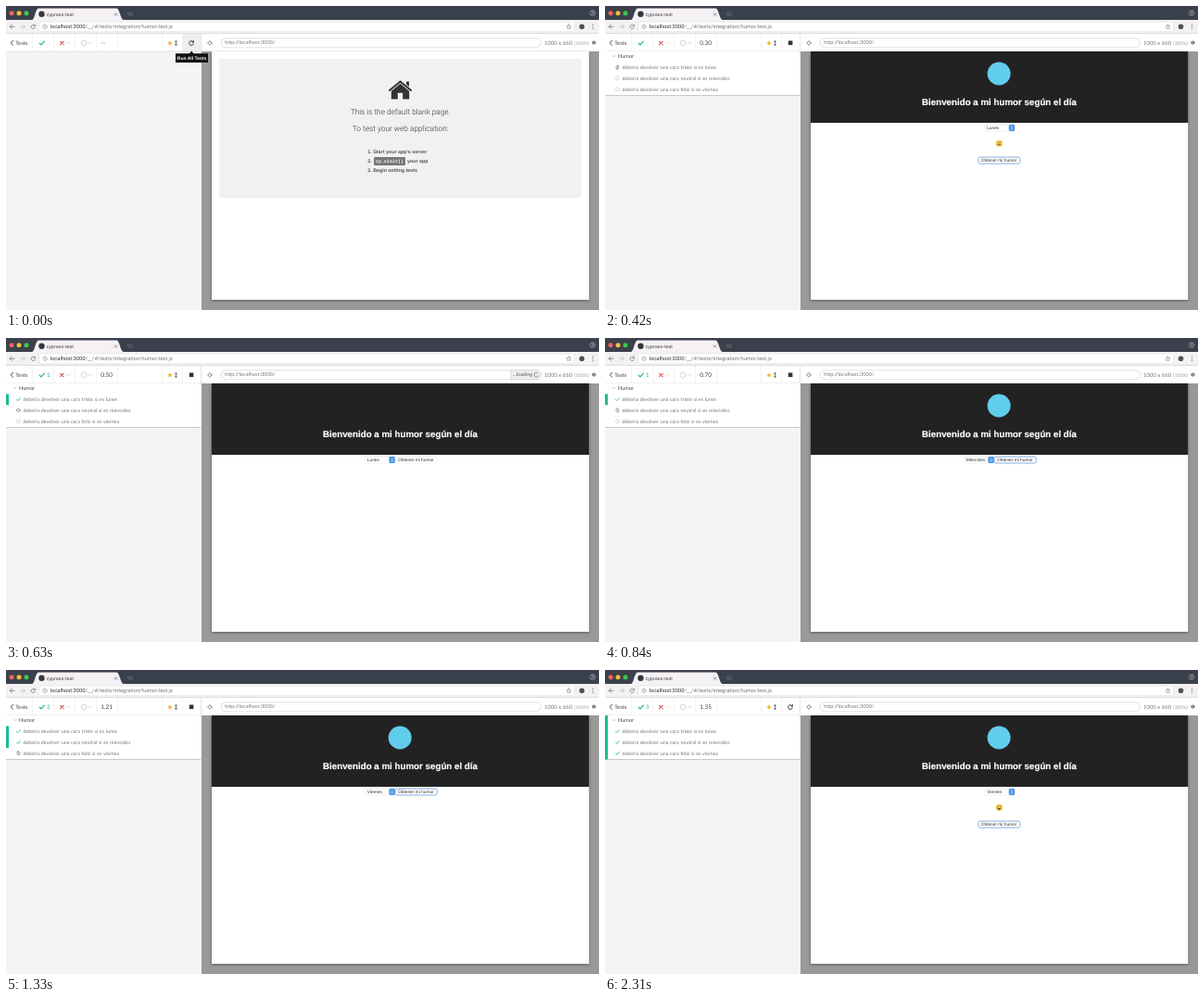
An HTML page that plays this animation: 640 px wide and 328 px high, repeating every 2.38 s.

```html
<!DOCTYPE html>
<html lang="es">
<head>
<meta charset="utf-8">
<title>cypress-test</title>
<style>
html, body { margin: 0; width: 100%; height: 100%; overflow: hidden; background: #fff; }
svg { display: block; width: 100%; height: 100%; }
text { white-space: pre; text-rendering: geometricPrecision; }
.ui { font-family: Lato, sans-serif; }
.bar { font-family: Roboto, sans-serif; }
.tab { font-family: Inter, sans-serif; }
.web { font-family: "Liberation Sans", Arial, sans-serif; }
.mono { font-family: "Liberation Mono", monospace; }
.line { fill: none; stroke-linecap: round; stroke-linejoin: round; }
</style>
</head>
<body>
<svg id="stage" viewBox="0 0 640 328" preserveAspectRatio="none" xmlns="http://www.w3.org/2000/svg">
  <defs>
    <filter id="soft" x="-5%" y="-5%" width="110%" height="115%"><feGaussianBlur stdDeviation="1.4"/></filter>
    <path id="check" class="line" d="M-2.2 .2 L-.7 1.7 L2.3 -1.6"/>
    <path id="cross" class="line" d="M-1.7 -1.7 L1.7 1.7 M1.7 -1.7 L-1.7 1.7"/>
    <path id="reload" class="line" d="M1.9 -1.4 A2.4 2.4 0 1 0 2.3 .8 M2.4 -2.4 V-.9 H.8"/>
    <path id="sync" class="line" d="M-1.6 -.4 A1.7 1.7 0 0 1 1.3 -1 M1.6 .4 A1.7 1.7 0 0 1 -1.3 1 M1.5 -1.8 V-.8 H.6 M-1.5 1.8 V.8 H-.6"/>
  </defs>

  <!-- browser window -->
  <rect width="640" height="15" fill="#3b414c"/>
  <circle cx="6.1" cy="7.7" r="2.5" fill="#f8625b"/>
  <circle cx="14" cy="7.7" r="2.5" fill="#f9bd39"/>
  <circle cx="22" cy="7.7" r="2.5" fill="#3cc848"/>
  <path d="M28 15 C31 14.5 32 2.4 35 2.4 H119.5 C122.5 2.4 123.5 14.5 127 15 Z" fill="#f5f1f4"/>
  <circle cx="38.5" cy="8.8" r="3.2" fill="#33363c"/>
  <text class="tab" x="43.6" y="10.8" font-size="4.95" fill="#333">cypress-test</text>
  <use href="#cross" transform="translate(118.5 9) scale(.75)" stroke="#666" stroke-width=".9"/>
  <path d="M129 5.8 H136 L138.8 11.4 H131.8 Z" fill="#4d5460" stroke="#2f343d" stroke-width=".5"/>
  <g class="line" stroke="#a4a9b1" stroke-width=".6">
    <circle cx="633" cy="7.5" r="2.8"/><circle cx="633" cy="6.6" r="1"/><path d="M631.2 9.4 Q633 7.4 634.8 9.4"/>
  </g>
  <rect y="15" width="640" height="14.5" fill="#f3f1f3"/>
  <rect x="36" y="17" width="577.5" height="10.6" rx="1.5" fill="#fff" stroke="#dcdcdc" stroke-width=".5"/>
  <g class="line" stroke="#666" stroke-width=".7">
    <path d="M9 22.3 H4.2 M6.4 20.1 L4.2 22.3 L6.4 24.5"/>
    <path stroke="#bbb" d="M15.7 22.3 H20.5 M18.3 20.1 L20.5 22.3 L18.3 24.5"/>
    <use href="#reload" transform="translate(29.3 22.3) scale(.9)"/>
    <g stroke="#888" stroke-width=".55"><circle cx="42" cy="22.3" r="2.2"/><path d="M42 22 V23.4 M42 20.9 V21"/></g>
    <path stroke="#777" stroke-width=".55" d="M607.5 19.8 L608.2 21.5 L610.1 21.7 L608.7 22.9 L609.1 24.7 L607.5 23.7 L605.9 24.7 L606.3 22.9 L604.9 21.7 L606.8 21.5 Z"/>
  </g>
  <text class="bar" x="47.6" y="24.3" font-size="5.77" fill="#333">localhost:3000<tspan fill="#777">/__/#/tests/integration/humor.test.js</tspan></text>
  <circle cx="621.5" cy="22.3" r="2.8" fill="#55504c"/>
  <g fill="#777"><circle cx="633.5" cy="20.2" r=".6"/><circle cx="633.5" cy="22.3" r=".6"/><circle cx="633.5" cy="24.4" r=".6"/></g>

  <!-- runner panel -->
  <rect y="30" width="211" height="298" fill="#f4f4f4"/>
  <rect y="30" width="640" height="19" fill="#fff"/>
  <path d="M0 29.6 H640" stroke="#d4d4d4" stroke-width=".8"/>
  <path id="dividers" fill="none" stroke="#eee" stroke-width=".7"/>
  <path class="line" d="M7.6 37.4 L5.2 39.8 L7.6 42.2" stroke="#444" stroke-width="1"/>
  <text class="ui" x="10.3" y="41.8" font-size="5.9" fill="#444">Tests</text>
  <use href="#check" transform="translate(38.8 40) scale(1.15)" stroke="#1db48c" stroke-width="1"/>
  <text class="ui" id="passed" x="44" y="42" font-size="6.2"></text>
  <use href="#cross" transform="translate(60.5 40)" stroke="#e2504c" stroke-width="1.2"/>
  <text class="ui" x="65" y="41.8" font-size="7" fill="#e29a98">--</text>
  <circle cx="84" cy="40" r="2.9" fill="none" stroke="#a8a8a8" stroke-width=".7" stroke-dasharray="2.4 .6"/>
  <text class="ui" x="88.6" y="41.8" font-size="7" fill="#aaa">--</text>
  <text class="ui" id="clock" x="102.3" y="42" font-size="6.5" fill="#444"></text>
  <path d="M177 37.4 L177.8 39.1 L179.6 39.3 L178.2 40.5 L178.6 42.3 L177 41.4 L175.4 42.3 L175.8 40.5 L174.4 39.3 L176.2 39.1 Z" fill="#f1b32c"/>
  <path class="line" d="M183.5 37.6 V42.4 M182.6 38.4 L183.5 37.5 L184.4 38.4 M182.6 41.6 L183.5 42.5 L184.4 41.6" stroke="#444" stroke-width=".7"/>
  <rect id="hover" x="190.5" y="30.2" width="19.5" height="18.6" fill="#eee"/>
  <rect id="stop" x="197.8" y="37.5" width="4.6" height="4.6" fill="#333"/>
  <use id="again" href="#reload" transform="translate(200 40)" stroke="#333" stroke-width=".95"/>
  <path d="M0 49 H211" stroke="#dcdcdc" stroke-width=".7"/>

  <g id="suite">
    <rect y="49" width="210.5" height="47.4" fill="#fff"/>
    <path d="M0 96.5 H210.5" stroke="#c4c4c4" stroke-width=".9"/>
    <rect id="passBar" width="3" fill="#1cb994"/>
    <path class="line" d="M8.2 53.6 L9.5 54.9 L10.8 53.6" stroke="#999" stroke-width=".6"/>
    <text class="ui" x="14" y="56.3" font-size="5.6" fill="#444">Humor</text>
    <g id="rows"></g>
  </g>

  <!-- preview area -->
  <rect x="211" y="49" width="429" height="279" fill="#999"/>
  <path d="M210.8 30 V49" stroke="#ddd" stroke-width=".7"/>
  <g class="line" stroke="#888" stroke-width=".6">
    <circle cx="220" cy="39.8" r="1.8"/><path d="M220 37 V38.6 M220 41 V42.6 M217.2 39.8 H218.8 M221.2 39.8 H222.8"/>
  </g>
  <rect x="232.3" y="34.8" width="345" height="10" rx="5" fill="#fff" stroke="#ccc" stroke-width=".6"/>
  <text class="ui" x="236.3" y="41.4" font-size="5.6" fill="#777">http://localhost:3000/</text>
  <g id="loading">
    <path d="M544.8 34.8 H572.5 A5 5 0 0 1 572.5 44.8 H544.8 Z" fill="#eee" stroke="#ccc" stroke-width=".6"/>
    <text class="ui" x="547" y="41.4" font-size="5.4" fill="#555">...loading</text>
    <circle id="wheel" cx="572.3" cy="39.8" r="2.3" fill="none" stroke="#777" stroke-width=".7" stroke-dasharray="11 3.4"/>
  </g>
  <text class="ui" x="581" y="41.8" font-size="5.95" fill="#777">1000 x 660</text>
  <text class="ui" x="613.3" y="41.5" font-size="5.1" fill="#999">(100%)</text>
  <circle cx="634.5" cy="39.6" r="2.1" fill="#777"/>
  <path d="M634.5 39.3 V40.8 M634.5 38.2 V38.7" stroke="#fff" stroke-width=".6"/>
  <rect x="221.8" y="50" width="407.6" height="268" fill="#444" opacity=".7" filter="url(#soft)"/>
  <rect x="222" y="49" width="407.3" height="268" fill="#fff"/>

  <g id="blank">
    <rect x="230" y="57" width="391" height="150" rx="3" fill="#f1f1f1"/>
    <path d="M415.8 91.2 L425.5 83.1 L435.2 91.2 V100.5 H428.2 V93.8 H422.8 V100.5 H415.8 Z" fill="#333"/>
    <path d="M432 81.5 H435 V88 L432 85.5 Z" fill="#333"/>
    <path d="M413.6 91.3 L425.5 81.3 L437.4 91.3" fill="none" stroke="#f1f1f1" stroke-width="3.6"/>
    <path class="line" d="M414 91 L425.5 81.4 L437 91" stroke="#333" stroke-width="2"/>
    <g class="bar" font-size="8.3" font-weight="300" fill="#333" text-anchor="middle">
      <text x="425.7" y="117.2">This is the default blank page.</text>
      <text x="425.7" y="135.2">To test your web application:</text>
    </g>
    <g class="web" font-size="5.35" font-weight="bold" fill="#555">
      <text x="390.3" y="159.3">1. Start your app's server</text>
      <text x="390.3" y="169.4">2.</text>
      <text x="433" y="169.4">your app</text>
      <text x="390.3" y="179.3">3. Begin writing tests</text>
    </g>
    <rect x="397" y="163" width="34" height="9" rx="1.2" fill="#777"/>
    <text class="mono" x="399" y="169.3" font-size="5" font-weight="bold" fill="#fff">cy.visit()</text>
  </g>

  <g id="app">
    <rect x="222" y="49" width="407.3" height="77" fill="#222"/>
    <circle id="logo" cx="425.2" cy="73" r="12.5" fill="#61cdec"/>
    <text class="web" x="425.5" y="106.5" font-size="9.76" font-weight="bold" fill="#fff" stroke="#fff" stroke-width=".2" text-anchor="middle">Bienvenido a mi humor según el día</text>
    <g id="picker">
      <rect x="387.3" y="128" width="32.4" height="7" rx="1.6" fill="#fff" stroke="#e2e2e2" stroke-width=".5"/>
      <rect x="413.4" y="128" width="6.4" height="7" rx="1.4" fill="#4795ea"/>
      <path class="line" d="M415.6 130.8 L416.6 129.8 L417.6 130.8 M415.6 132.3 L416.6 133.3 L417.6 132.3" stroke="#fff" stroke-width=".6"/>
      <text class="web" id="day" x="389.8" y="133.2" font-size="4.8" fill="#333"></text>
    </g>
    <g id="button">
      <rect id="edge" x="420.2" y="128" width="45" height="7" rx="1.8" fill="#fff"/>
      <text class="web" x="423" y="133.2" font-size="4.8" fill="#333">Obtener mi humor</text>
    </g>
    <g id="face">
      <circle cx="425.4" cy="148.3" r="3.6" fill="#f7cb45"/>
      <circle cx="424.2" cy="147.1" r=".55" fill="#5b4012"/>
      <circle cx="426.6" cy="147.1" r=".55" fill="#5b4012"/>
      <path id="mouth" fill="#6b4a1c" stroke="#6b4a1c" stroke-width=".5" stroke-linecap="round"/>
    </g>
  </g>

  <g id="tip">
    <path d="M183 51.2 H198 L200.2 48.6 L202.4 51.2 H218 V61 H183 Z" fill="#111"/>
    <text class="web" x="200.5" y="57.9" font-size="5" font-weight="bold" fill="#fff" text-anchor="middle">Run All Tests</text>
  </g>
</svg>

<script>
const LOOP = 2380, STEP = 70, START = 70, TEST = 490, END = 1540;
const days = ["Lunes", "Miercoles", "Viernes"];
const titles = ["triste si es lunes", "neutral si es miercoles", "feliz si es viernes"];
const bends = [-1.6, 0, 3.4];

const el = id => document.getElementById(id);
const show = (id, on) => el(id).setAttribute("display", on ? "inline" : "none");
const set = (id, attrs) => { for (const k in attrs) el(id).setAttribute(k, attrs[k]); };

set("dividers", { d: [28.5, 51.5, 74.5, 97.5, 120.5, 168.5, 190.5, 210].map(x => `M${x} 30 V49`).join("") });

el("rows").innerHTML = titles.map((title, i) => `
  <g transform="translate(13.5 ${66.2 + 11.8 * i})">
    <use id="ok${i}" href="#check" transform="scale(.85)" stroke="#1db48c" stroke-width="1"/>
    <use id="run${i}" href="#sync" stroke="#777" stroke-width=".7"/>
    <circle id="wait${i}" r="1.9" fill="none" stroke="#aaa" stroke-width=".6" stroke-dasharray="1.7 .4"/>
    <text class="ui" x="4.9" y="1.7" font-size="5.4" word-spacing=".3" fill="#777">debería devolver una cara ${title}</text>
  </g>`).join("");

function clockText(t) {
  if (t < START + 2 * STEP) return "--";
  if (t >= END) return "1.35";
  const tenths = Math.floor(5 + (t - 560) * 0.0092 + 1e-6) / 10;
  return (tenths + (tenths > 1 ? 0.01 : 0)).toFixed(2);
}

function draw(time) {
  const t = Math.floor(time / STEP) * STEP;
  const running = t >= START && t < END, done = t >= END;
  const passed = done ? 3 : Math.max(0, Math.floor((t - START) / TEST));
  const part = done ? TEST : (t - START) % TEST;
  const answered = part >= 350;

  show("blank", t < START);
  show("tip", t < START);
  show("hover", t < START);
  show("suite", t >= START);
  show("stop", running);
  show("again", !running);
  show("loading", running && part < 140);
  set("wheel", { transform: `rotate(${t * 0.6} 572.3 39.8)` });

  el("passed").textContent = passed || "--";
  set("passed", { fill: passed ? "#1db48c" : "#9fc9bc" });
  el("clock").textContent = clockText(t);
  set("passBar", { y: done ? 49 : 60.5, height: done ? 47.4 : 11.8 * passed });
  titles.forEach((_, i) => {
    show("ok" + i, i < passed);
    show("run" + i, i === passed);
    show("wait" + i, i > passed);
    set("run" + i, { transform: `rotate(${t * 0.36})` });
  });

  const test = Math.min(passed, 2);
  show("app", t >= START && part >= 70);
  show("logo", part >= 140);
  show("face", answered);
  el("day").textContent = days[part >= 210 ? test : 0];
  set("picker", { transform: answered ? "translate(22.4 0)" : "" });
  set("button", { transform: answered ? "translate(-17.3 35.1)" : "" });
  const focused = part >= 280;
  set("edge", { stroke: focused ? "#86aee2" : "#e2e2e2", "stroke-width": focused ? 1 : 0.5 });
  set("mouth", { d: `M423.5 ${149.5 - bends[test] / 6} q1.9 ${bends[test]} 3.8 0` });
}

const origin = performance.now();
function tick() {
  draw((performance.now() - origin) % LOOP);
  requestAnimationFrame(tick);
}
draw(0);
requestAnimationFrame(tick);
</script>
</body>
</html>
```
